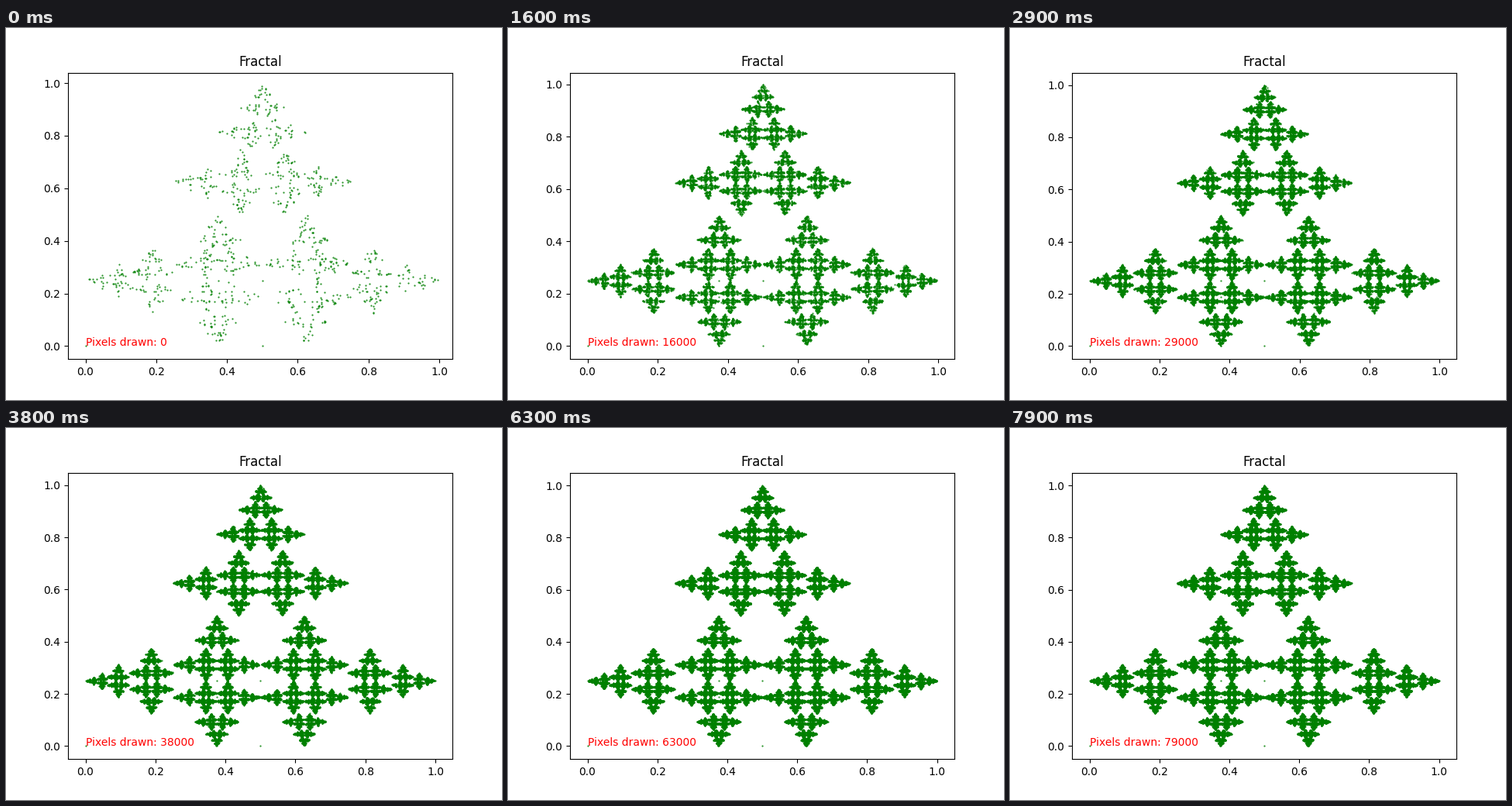
Animation of 640 by 480 pixels, one loop 8 s. Source, as a matplotlib script:

```python
import math
import random

import matplotlib.pyplot as plt
import numpy as np
from matplotlib.animation import FuncAnimation

FRAMES = 80
BATCH = 1000
MARGIN = .05


def top(x, y):
    return .25 + x / 2, .5 + y / 2


def left(x, y):
    return .5 - y / 2, x / 2


def right(x, y):
    return .5 + y / 2, .5 - x / 2


def chaos_game(count):
    rng = random.Random(4)
    pts = [(0.0, 0.0)]
    while len(pts) < count:
        # the walk spirals inward before it turns random
        rule = left if len(pts) < 5 else rng.choice((top, left, right))
        pts.append(rule(*pts[-1]))
    return np.array(pts)


def limits(i, gap, decay):
    """Axis range as the points close in on 1."""
    reach = .9995 - gap * math.exp(-i / decay)
    return -MARGIN * reach, (1 + MARGIN) * reach


points = chaos_game(FRAMES * BATCH)

fig, ax = plt.subplots(figsize=(6.4, 4.8), dpi=100)
ax.set_title("Fractal")
dots, = ax.plot([], [], ".", color="green", markersize=1)
label = ax.text(0, 0, "", color="red")


def update(i):
    dots.set_data(*points[:(i + 1) * BATCH].T)
    ax.set_xlim(limits(i, gap=.0118, decay=13))
    ax.set_ylim(limits(i, gap=.0092, decay=20))
    label.set_text(f"Pixels drawn: {i * BATCH}")
    return dots, label


anim = FuncAnimation(fig, update, frames=FRAMES, interval=100,
                     repeat=True, repeat_delay=0)
plt.show()
```
